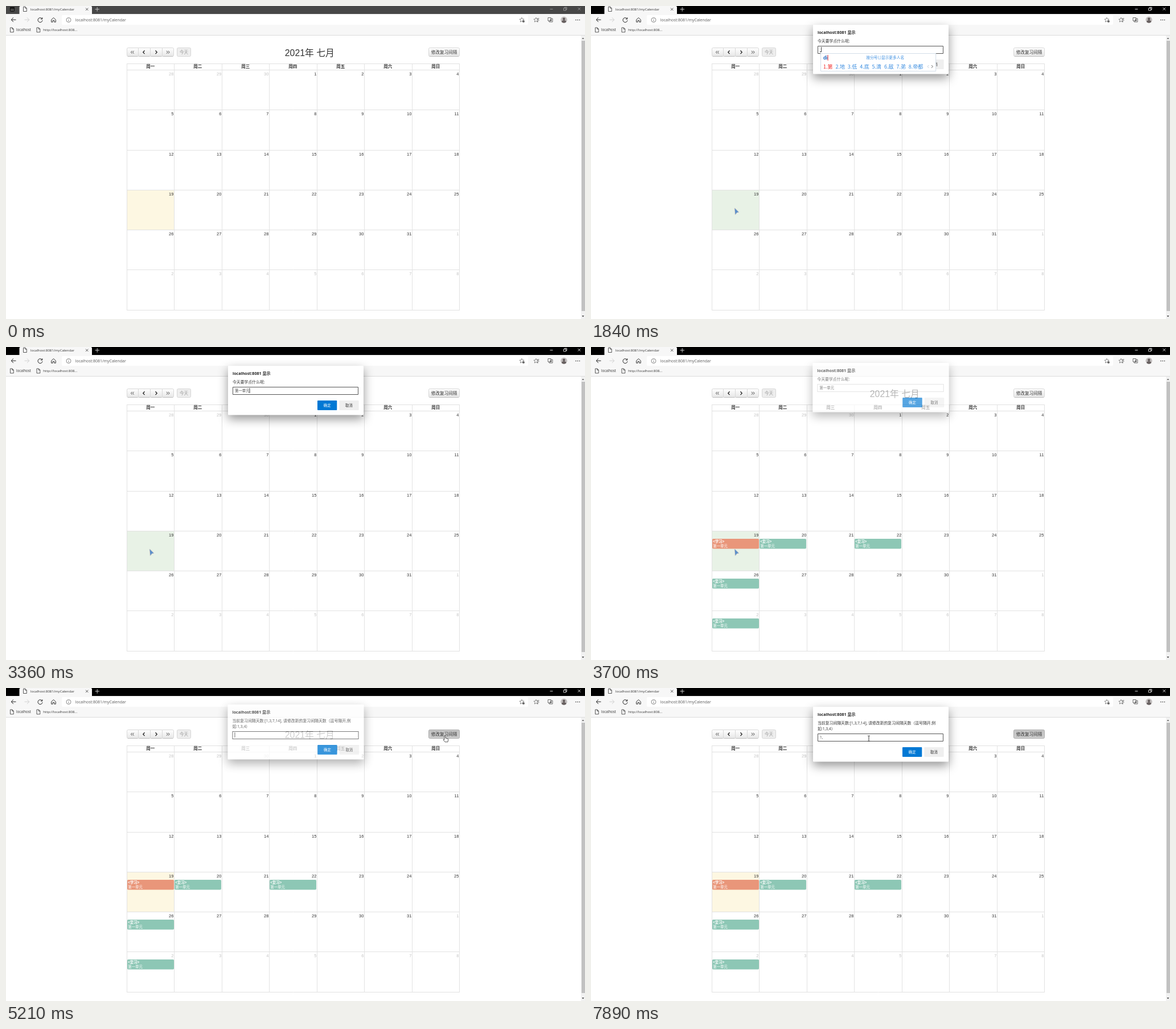
An HTML page with a canvas for the animation above (8000 ms loop, 1017x550 px).

```html
<!DOCTYPE html>
<html lang="zh">
<head>
<meta charset="utf-8">
<style>
html, body { margin: 0; width: 100%; height: 100%; overflow: hidden; background: #fff; }
canvas { display: block; }
</style>
</head>
<body>
<canvas id="stage" width="1017" height="550"></canvas>
<script>
const screen2d = document.getElementById('stage').getContext('2d');
const layer = Object.assign(document.createElement('canvas'), { width: 1017, height: 550 });
const layer2d = layer.getContext('2d');
let ctx = screen2d;

const LOOP = 8000;
const UI = '"Open Sans", "Noto Sans CJK SC", "Noto Sans CJK", sans-serif';
const PAGE = '"Liberation Sans", "Noto Sans CJK SC", "Noto Sans CJK", sans-serif';
const CJK = '"Noto Sans CJK SC", "Noto Sans CJK", sans-serif';
const GRID = '#e2e2e2';

// Stepped states: the last entry whose time has passed is in force.
const DIALOG = [ // time, opacity, lift
  [0, 0, 0], [980, .77, 4], [1045, .95, 1], [1110, 1, 0],
  [3630, .92, 1], [3700, .66, 5], [3770, .25, 9], [3850, 0, 0],
  [5210, .77, 4], [5280, .95, 1], [5345, 1, 0],
];
const INPUT = [[0, ''], [3360, '第一单元'], [4000, ''], [7030, '1'], [7360, '1,']];
const CARET_RESETS = [[0], [910], [1770], [3360], [5210], [5980], [7030], [7360]];
const IME = [ // time, pinyin, candidates
  [0, '', ''],
  [1770, "d", '的 都 到 大 对 但 得 多少'],
  [1840, "di", '第 地 低 底 滴 敌 弟 帝都'],
  [2100, "di'y", '第一 地狱 抵押 敌意 低音 地域 抵御 低压'],
  [2170, "di'yi", '第一 敌意 地衣 帝一 地一 迪依 低一 滴一'],
  [2310, "di'yi'd", '第一代 第一单 第一等 第一段 第一弹 第一次 第一大 第一点'],
  [2500, "di'yi'da", '第一大 第一打 第一答 第一 敌意 地衣 帝一 地一'],
  [2630, "di'yi'dan", '第一弹 第一单 第一 敌意 地衣 帝一 地一 迪依'],
  [2830, "di'yi'dan'y", '第一单元 第一单页 第一弹 第一单 第一 敌意 地衣 帝一'],
  [2960, "di'yi'dan'yu", '第一单元 第一单 第一弹 第一 敌意 地衣 帝一 地一'],
  [3090, "di'yi'dan'yua", '第一单元 第一单 第一弹 第一 敌意 地衣 帝一 地一'],
  [3160, "di'yi'dan'yuan", '第一单元 第一单 第一弹 第一 敌意 地衣 帝一 地一'],
  [3360, '', ''],
];
const MOVES = [ // start, end, steps, from, to
  [130, 840, 11, [1000, 526], [252.5, 355.5]],
  [4240, 4940, 10, [252.5, 355.5], [771, 84]],
  [5280, 5830, 8, [771, 84], [490.5, 88.5]],
  [5900, 6100, 3, [490.5, 88.5], [488, 88.5]],
];
const EVENTS = [[0, 3, '学习'], [1, 3, '复习'], [3, 3, '复习'], [0, 4, '复习'], [0, 5, '复习']];

const at = (states, t) => states.filter(s => s[0] <= t).pop();
const colX = i => Math.round(212 + 83.45 * i);
const rowY = i => Math.round(112 + 70.25 * i);

function text(str, x, y, size, color, { font = PAGE, weight = 400, align = 'left' } = {}) {
  ctx.font = `${weight} ${size}px ${font}`;
  ctx.textAlign = align;
  ctx.fillStyle = color;
  ctx.fillText(str, x, y);
  return ctx.measureText(str).width;
}
function box(x, y, w, h, fill, { r = 0, stroke } = {}) {
  ctx.beginPath();
  ctx.roundRect(x, y, w, h, r);
  if (fill) { ctx.fillStyle = fill; ctx.fill(); }
  if (stroke) { ctx.strokeStyle = stroke; ctx.lineWidth = 1; ctx.stroke(); }
}
function line(d, color = '#333', width = 1) {
  ctx.strokeStyle = color;
  ctx.lineWidth = width;
  ctx.stroke(new Path2D(d));
}
function shape(d, fill) {
  ctx.fillStyle = fill;
  ctx.fill(new Path2D(d));
}
function disc(x, y, r, fill) {
  ctx.beginPath();
  ctx.arc(x, y, r, 0, 7);
  ctx.fillStyle = fill;
  ctx.fill();
}
const pageIcon = (x, y) => line(`M${x} ${y}h3.5l2.3 2.3v5.7h-5.8zM${x + 3.3} ${y}v2.5h2.5`, '#333', .8);
const star = (x, y) => line(`M${x} ${y}l1.2 2.6 2.8.3-2 2 .6 2.8-2.6-1.4-2.6 1.4.6-2.8-2-2 2.8-.3z`, '#444', .6);

function drawBrowser(active) {
  const controls = active ? '#fff' : '#a0a0a0';
  box(0, 0, 1017, 14, active ? '#000' : '#474747');
  if (!active) {
    box(7.5, 2.5, 7, 7, null, { r: 1, stroke: '#0c0c0c' });
    box(7, 2, 8, 2.5, '#0c0c0c');
  }
  box(23.5, 0, 127.5, 15, '#f7f7f7', { r: [2, 2, 0, 0] });
  pageIcon(30.5, 1.5);
  text('localhost:8081/myCalendar', 43, 8.2, 6.05, '#333', { font: UI });
  line('M140 3.5l4.4 4.4m0-4.4l-4.4 4.4', '#333', .8);
  line('M156.5 5.7h7.5M160.2 2v7.5', active ? '#ddd' : '#ccc', .9);
  line('M955.5 5.5h5M979.5 3.8h4v4h-4zM981 3.5v-1.2h4v4h-1.2M1004.5 2.8l4.6 4.6m0-4.6l-4.6 4.6', controls, .8);

  box(0, 14, 1017, 38, '#f7f7f7');
  box(0, 51, 1017, 1, '#dcdcdc');
  box(98, 16, 819, 17, '#fff', { r: 2 });
  line('M17.5 24.2H9.3M13 20.4L9.2 24.2L13 28', '#222');
  line('M32.5 24.2h8.2M37 20.4l3.8 3.8l-3.8 3.8', '#d2d2d2');
  line('M63.4 22.5A4 4 0 1 0 64 25.2M63.8 20.2v2.8h-2.8', '#222');
  line('M79.7 24L83.5 20.5L87.3 24V28.2H84.8V25.4H82.2V28.2H79.7Z', '#222', .9);
  line('M114 24.5a4 4 0 1 0-8 0a4 4 0 1 0 8 0M110 24v2.8M110 22v.9', '#666', .8);
  text('localhost:8081/myCalendar', 121.7, 27, 7, '#5a5a5a', { font: UI });
  star(906, 20.3);
  disc(909, 27, 2, '#666');
  star(931, 20.3);
  line('M933 22h3.5M933.5 25h3M933 27.5h2', '#333', .7);
  line('M952 20.5h5v5.5h-5zM954 26v2h6v-6h-3M957 23v4M955 25h4', '#333', .7);
  disc(980, 24.3, 5.7, '#c4c0c0');
  disc(980, 22.8, 2.2, '#665f5f');
  shape('M976 28a4 3 0 0 1 8 0a5.5 5.5 0 0 1-8 0z', '#665f5f');
  [1001, 1004.2, 1007.4].forEach(x => disc(x, 24.5, .8, '#222'));

  pageIcon(7.5, 38);
  text('localhost', 18, 44.2, 6.2, '#333', { font: UI });
  pageIcon(54, 38);
  text('http://localhost:808...', 65.3, 44.2, 6.05, '#333', { font: UI });

  box(1010, 52, 7, 498, '#f1f1f1');
  box(1011, 61, 6, 475, '#c1c1c1');
  shape('M1011.5 58l2-2.5 2 2.5z', '#666');
  shape('M1011.5 544l2 2.5 2-2.5z', '#444');
}

function button(x, w, radius, pressed) {
  const fill = ctx.createLinearGradient(0, 73, 0, 89);
  fill.addColorStop(0, pressed ? '#c2c2c2' : '#fff');
  fill.addColorStop(1, pressed ? '#cecece' : '#e6e6e6');
  box(x + .5, 73.5, w, 15, fill, { r: radius, stroke: pressed ? '#adadad' : '#d8d8d8' });
  if (!pressed) box(x + 2, 88, w - 3, 1, '#bdbdbd');
}

function drawCalendar(t) {
  [[212, 20], [232, 21], [253, 21], [274, 20]].forEach(([x, w], i) =>
    button(x, w, i === 0 ? [2, 0, 0, 2] : i === 3 ? [0, 2, 2, 0] : 0));
  line('M221.5 78.8l-2 2.4 2 2.4M224.5 78.8l-2 2.4 2 2.4M282 78.8l2 2.4-2 2.4M285 78.8l2 2.4-2 2.4', '#333', .9);
  line('M243.5 78.3l-2.7 2.9 2.7 2.9M262.5 78.3l2.7 2.9-2.7 2.9', '#222', 1.3);
  box(300.5, 73.5, 24, 15, '#eee', { r: 2, stroke: '#d6d6d6' });
  text('今天', 312.5, 84, 7.5, '#9b9b9b', { align: 'center' });
  button(742, 54, 2, t >= 5070);
  text('修改复习间隔', 769.5, 84, 7.6, '#333', { align: 'center' });
  text('2021年 七月', 533.3, 88, 15.8, '#333', { align: 'center' });

  const selected = t >= 840 && t < 5070;
  box(colX(0), rowY(3), colX(1) - colX(0), rowY(4) - rowY(3), selected ? '#e8f2e6' : '#fdf7e2');
  for (let i = 0; i <= 7; i++) line(`M${colX(i) + .5} 101V534.5`, GRID);
  line('M212 101.5H797', GRID);
  for (let i = 0; i <= 6; i++) line(`M212 ${rowY(i) + .5}H797`, GRID);
  [...'一二三四五六日'].forEach((day, i) =>
    text('周' + day, colX(i) + 41.8, 109.3, 7.5, '#333', { weight: 700, align: 'center' }));

  for (let i = 0; i < 42; i++) {
    const day = i - 2;
    const label = day < 1 ? day + 30 : day > 31 ? day - 31 : day;
    text(label, colX(i % 7 + 1) - .7, rowY(Math.floor(i / 7)) + 9.8, 7.5,
      day === label ? '#333' : '#c4c4c4', { align: 'right' });
  }
  if (t >= 3700) for (const [col, row, kind] of EVENTS) {
    const x = colX(col), y = rowY(row);
    box(x + 1, y + 14, 82, 17.5, kind === '学习' ? '#e9967a' : '#8dc7b5', { r: 1.7 });
    text(`<${kind}>`, x + 2.3, y + 20.9, 6.3, '#fff', { weight: 700 });
    text('第一单元', x + 2.3, y + 28.9, 6.4, '#fff');
  }
}

function drawDialogContent(t) {
  const second = t > 4000, drop = second ? 10 : 0;
  const focused = t < 3630 || second;
  const composing = at(IME, t)[1] !== '';

  ctx.save();
  ctx.shadowColor = 'rgba(0,0,0,.42)';
  ctx.shadowBlur = 18;
  ctx.shadowOffsetY = 7;
  box(390, 33, 238, 86.4 + drop, '#fff', { r: 1 });
  ctx.restore();

  text('localhost:8081 显示', 398, 48.7, 7.1, '#222', { font: UI, weight: 700 });
  const message = second
    ? ['当前复习间隔天数:[1,3,7,14], 请修改新的复习间隔天数（逗号隔开,例', '如:1,3,4）']
    : ['今天要学点什么呢:'];
  message.forEach((row, i) => text(row, 398, 64 + i * 9.5, 6.85, '#333', { font: UI }));

  box(398.5, 70.5 + drop, 220, 13, '#fff', { stroke: focused ? '#555' : '#d8d8d8' });
  const width = text(at(INPUT, t)[1], 402, 79.4 + drop, 6.4, '#444', { font: UI });
  if (composing) box(402, 80, 2, 1, '#333');
  const sinceReset = t - at(CARET_RESETS, t)[0];
  if (focused && sinceReset % 1060 < 530)
    box(402 + (composing ? 2 : width), 72 + drop, .9, 9, '#333');

  box(547, 94 + drop, 34.3, 17, '#0078d4', { r: 1 });
  box(585.3, 94 + drop, 34.3, 17, '#efefef', { r: 1 });
  text('确定', 564.2, 104.9 + drop, 6.4, '#fff', { font: UI, align: 'center' });
  text('取消', 602.4, 104.9 + drop, 6.4, '#333', { font: UI, align: 'center' });
}

// The dialog fades as one group, so it is composed on its own layer first.
function drawDialog(t) {
  const [, alpha, lift] = at(DIALOG, t);
  if (!alpha) return;
  const scale = 1 + Math.min(lift, 5) * .0012;
  ctx = layer2d;
  ctx.clearRect(0, 0, 1017, 550);
  ctx.save();
  ctx.translate(508.8 * (1 - scale), -lift);
  ctx.scale(scale, 1);
  drawDialogContent(t);
  ctx.restore();
  ctx = screen2d;
  ctx.globalAlpha = alpha;
  ctx.drawImage(layer, 0, 0);
  ctx.globalAlpha = 1;
}

function drawIme(t) {
  const [, pinyin, words] = at(IME, t);
  if (!pinyin) return;
  const items = words.split(' ').map((word, i) => `${i + 1}.${word}`);
  const style = { font: CJK }, gap = 4.9;
  ctx.font = `400 9px ${CJK}`;
  const end = items.reduce((x, item) => x + ctx.measureText(item).width + gap, 408);
  box(403.5, 83.5, end - 386, 31, '#fff', { stroke: '#d3dde8' });
  const width = text(pinyin, 408, 94, 8.6, '#1763bd', { weight: 700 });
  box(408 + width, 86, 1, 10, '#f33');
  text('按分号(;)显示更多人名', 483.5, 93.3, 6.7, '#3a8de0', style);
  let x = 408;
  items.forEach((item, i) => {
    x += text(item, x, 109.6, 9, i ? '#3a8de0' : '#f02525', style) + gap;
  });
  line(`M${x + 5} 104l-2 2.4 2 2.4`, '#b9c6d4', .9);
  line(`M${x + 10} 104l2 2.4-2 2.4`, '#555', .9);
}

function drawCursor(t) {
  const move = at(MOVES, t);
  if (!move) return;
  const [start, end, steps, from, to] = move;
  const p = Math.min(1, Math.floor((t - start) / (end - start) * steps + 1e-6) / steps);
  const ease = p * p * (3 - 2 * p);
  const [x, y] = from.map((v, i) => v + (to[i] - v) * ease);
  ctx.save();
  ctx.translate(x, y);
  ctx.lineJoin = 'round';
  if (y < 95 && x > 741 && x < 797) {
    const hand = 'M-1 1a1 1 0 0 1 2 0v3l4 1q1 .4 .8 1.6l-.8 4.2h-5l-3-4q0-1.4 2 0z';
    shape(hand, '#fff');
    line(hand, '#333', .8);
  } else if (t > 5210 && x > 398 && x < 620) {
    line('M-2 -4.5h1.5l.5 .5l.5-.5h1.5M0 -4v8.5M-2 5h1.5l.5-.5l.5 .5h1.5', '#222', .9);
  } else {
    const arrow = 'M0 0L6.8 6.8L3.8 7.2L1 10.8Z';
    line(arrow, '#d5cfc8', 1.6);
    shape(arrow, '#5b8fca');
  }
  ctx.restore();
}

function draw(now) {
  const t = now % LOOP;
  box(0, 0, 1017, 550, '#fff');
  drawBrowser(t >= 840);
  drawCalendar(t);
  drawDialog(t);
  drawIme(t);
  drawCursor(t);
}

const begin = performance.now();
function tick() {
  draw(performance.now() - begin);
  requestAnimationFrame(tick);
}
tick();
</script>
</body>
</html>
```
